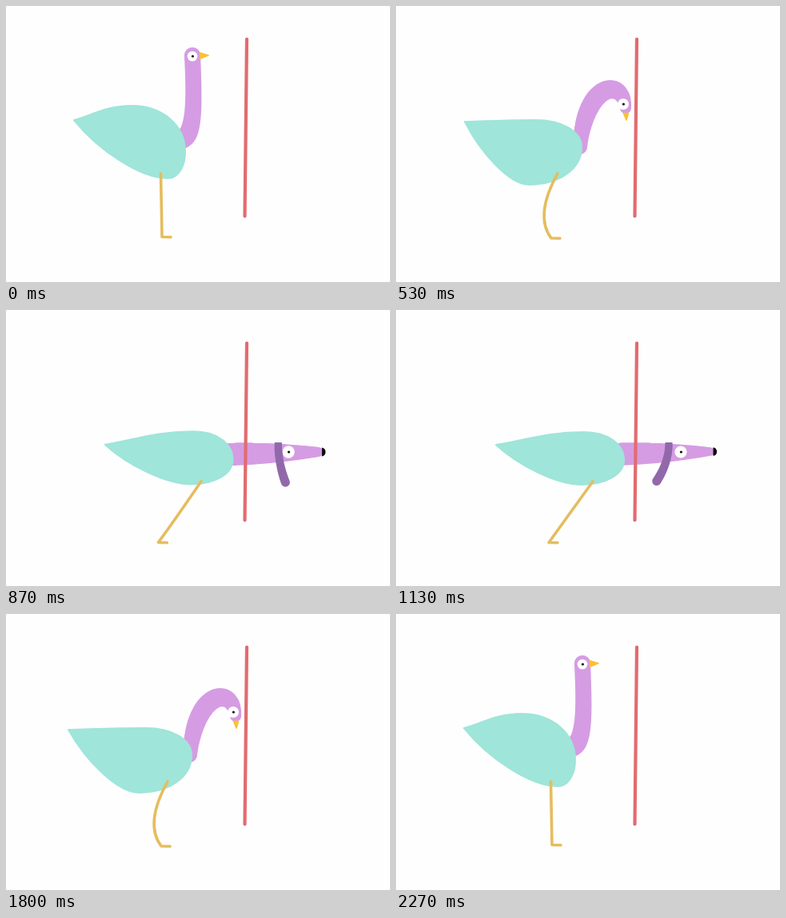
Animation, 480 px wide and 346 px high, one loop 2990 ms. Source, as an HTML page with a canvas:

```html
<!DOCTYPE html>
<html lang="en">
<head>
<meta charset="utf-8">
<title>Bird and pole</title>
<style>
html, body { margin: 0; width: 100%; height: 100%; overflow: hidden; background: #fefefe; }
canvas { display: block; width: 480px; height: 346px; }
</style>
</head>
<body>
<canvas id="stage" width="480" height="346"></canvas>
<script>
const ctx = document.getElementById('stage').getContext('2d');
const LOOP = 2990, FPS = 15, POLE_X = 300;
const MINT = '#9fe5d9', LILAC = '#d59ce3', LID = '#dcaae8', EAR = '#9169aa',
      LEG = '#e5bd5f', BEAK = '#fbc035', POLE = '#e16c70', INK = '#0b0b0b';

// body: tail, top, front, bottom; neck: Bezier from head to base; girth: its radii
// beak: x, y, angle, length; nose: x, y, height; leg: hip, ankle, knee bend
const stand = {
  body: [85, 143, 157, 125, 224, 183, 202, 216],
  neck: [233, 62, 235, 110, 237, 160, 221, 166], girth: [10.2, 9.5, 12.5],
  eye: [233, 63, 6.3], tip: [242, 62.3, 0, 12], ear: [240],
  leg: [193.5, 210, 195, 289.5, 0]
};
const peck = {
  body: [86, 145, 175, 143, 232, 177, 166, 224],
  neck: [287, 128, 284, 88, 236, 96, 230, 177], girth: [7, 16, 9],
  eye: [284, 123, 7], tip: [287.5, 134, 1.57, 10], ear: [240],
  leg: [202, 210, 194, 291, -24]
};
const rise = {
  body: [85, 149, 176, 128, 228, 174, 190, 210],
  neck: [257, 63, 228, 82, 238, 115, 230, 162], girth: [7, 9.5, 11],
  eye: [252, 66.5, 7], tip: [261, 67.5, 0.85, 11], ear: [240],
  leg: [193.5, 204, 194, 292, 1]
};
const out = {
  dog: true,
  body: [120, 168, 235, 150, 279, 186, 230, 217],
  neck: straight(383, 179.5, 270, 182), girth: [8.3, 14.5, 14.5],
  eye: [344.5, 178, 7.8], tip: [390, 179.5, 5.7, 0], ear: [338],
  leg: [238, 214, 188.5, 291, 4]
};
const rest = {
  dog: true,
  body: [125, 169, 235, 153, 285, 188, 232, 219],
  neck: straight(393, 177.5, 275, 181), girth: [5.3, 14, 14],
  eye: [356, 178, 7.6], tip: [396.5, 177.5, 5.3, 0], ear: [341],
  leg: [246, 215, 191, 291.5, 0]
};
const tall = {
  ...stand,
  neck: [238, 31, ...stand.neck.slice(2)],
  eye: [238, 32, 6.3], tip: [247, 31.3, 0, 12]
};
const dive = {
  ...mix(peck, out, 0.45),
  dog: true,
  neck: straight(318, 179, 240, 180),
  eye: [285, 176, 7], tip: [323, 179, 5.5, 0]
};
const recoil = { ...peck, body: [78, ...peck.body.slice(1)] };

const keys = [
  [0, stand], [3, tall], [4, tall], [6, mix(rise, peck, 0.4)], [8, peck],
  [9, dive], [11, out], [13, mix(out, rest, 0.75)], [16, rest], [25, rest],
  [26, mix(rest, dive, 0.6)], [27, recoil], [29, rise], [31, stand], [60, stand]
];
const BLINK = 25, EAR_LENGTH = 48;

function lerp(a, b, k) {
  return a + (b - a) * k;
}

function straight(x0, y0, x1, y1) {
  return [0, 1 / 3, 2 / 3, 1].flatMap(k => [lerp(x0, x1, k), lerp(y0, y1, k)]);
}

function mix(a, b, k) {
  const pose = { dog: a.dog };
  for (const part in a)
    if (part !== 'dog') pose[part] = a[part].map((v, i) => lerp(v, b[part][i], k));
  return pose;
}

function poseAt(tick) {
  const i = keys.findIndex(key => key[0] > tick);
  const [t0, a] = keys[i - 1], [t1, b] = keys[i];
  return tick === t0 ? a : mix(a, b, (tick - t0) / (t1 - t0));
}

// de Casteljau, for any number of values
function bezier(values, k) {
  while (values.length > 1)
    values = values.slice(1).map((v, i) => lerp(values[i], v, k));
  return values[0];
}

function tube(list, girth, color) {
  const xs = list.filter((v, i) => i % 2 === 0), ys = list.filter((v, i) => i % 2);
  ctx.beginPath();
  for (let k = 0; k <= 1; k += 1 / 128) {
    const x = bezier(xs, k), y = bezier(ys, k), r = bezier(girth, k);
    ctx.moveTo(x + r, y);
    ctx.arc(x, y, r, 0, 7);
  }
  fill(color);
}

function fill(color, edge) {
  ctx.fillStyle = ctx.strokeStyle = color;
  ctx.fill();
  if (edge) {
    ctx.lineWidth = edge;
    ctx.stroke();
  }
}

function stroke(color, width) {
  ctx.strokeStyle = color;
  ctx.lineWidth = width;
  ctx.stroke();
}

function line(x0, y0, x1, y1, color, width) {
  ctx.beginPath();
  ctx.moveTo(x0, y0);
  ctx.lineTo(x1, y1);
  stroke(color, width);
}

function disc(x, y, r, color) {
  ctx.beginPath();
  ctx.arc(x, y, r, 0, 7);
  fill(color);
}

function drawBody([tx, ty, ux, uy, fx, fy, bx, by]) {
  const ROUND = 0.58;
  ctx.beginPath();
  ctx.moveTo(tx, ty);
  ctx.bezierCurveTo(lerp(tx, ux, 0.3), lerp(ty, uy, 0.3), lerp(ux, tx, 0.45), uy, ux, uy);
  ctx.bezierCurveTo(lerp(ux, fx, ROUND), uy, fx, lerp(fy, uy, ROUND), fx, fy);
  ctx.bezierCurveTo(fx, lerp(fy, by, ROUND), lerp(bx, fx, ROUND), by, bx, by);
  ctx.bezierCurveTo(lerp(bx, tx, 0.3), by, lerp(tx, bx, 0.25), lerp(ty, by, 0.5), tx, ty);
  ctx.closePath();
  fill(MINT, 2);
}

function drawLeg([hx, hy, ax, ay, bend]) {
  ctx.beginPath();
  ctx.moveTo(hx, hy);
  ctx.quadraticCurveTo(lerp(hx, ax, 0.65) + bend, lerp(hy, ay, 0.65), ax, ay);
  ctx.lineTo(ax + 11, ay + 0.3);
  stroke(LEG, 3.6);
}

function drawEye([x, y, r], shut) {
  if (shut) {
    ctx.beginPath();
    ctx.roundRect(x - 10, y - 9, 21, 18, 7);
    fill(LID);
    line(x - 7, y + 0.6, x + 3.5, y - 0.2, INK, 2.6);
  } else {
    disc(x, y, r, '#fff');
    disc(x + 0.4, y, 1.6, INK);
  }
}

function drawBeak([x, y, angle, len]) {
  const half = len * 0.3;
  ctx.save();
  ctx.translate(x, y);
  ctx.rotate(angle);
  ctx.beginPath();
  ctx.moveTo(0.6, -half);
  ctx.lineTo(len - 1, -0.5);
  ctx.lineTo(0.6, half);
  ctx.closePath();
  fill(BEAK, 1.6);
  ctx.restore();
}

// the ear swings every six ticks until it hangs still
function earSwing(tick) {
  const fade = Math.max(0, 1 - (tick - 9) / 12);
  return -20 * Math.cos((tick - 11) * Math.PI / 3) * fade ** 0.25;
}

function drawDogFace({ eye, tip: [x, y, half], ear: [root] }, tick) {
  const dx = earSwing(tick), drop = Math.sqrt(EAR_LENGTH ** 2 - dx * dx);
  ctx.save();
  ctx.beginPath();
  ctx.rect(POLE_X, 166, 180, 180);
  ctx.clip();
  drawEye(eye, tick === BLINK);
  tube([root, 168, root, 168 + drop / 2, root + dx, 169 + drop], [4.7, 5, 5.6], EAR);
  ctx.beginPath();
  ctx.ellipse(x, y, 4.6, half, 0, -Math.PI / 2, Math.PI / 2);
  fill(INK);
  ctx.restore();
}

function draw(tick) {
  const pose = poseAt(tick);
  ctx.fillStyle = '#fefefe';
  ctx.fillRect(0, 0, 480, 346);
  ctx.lineCap = ctx.lineJoin = 'round';

  tube(pose.neck, pose.girth, LILAC);
  if (pose.dog) {
    drawDogFace(pose, tick);
  } else {
    drawBeak(pose.tip);
    drawEye(pose.eye, false);
  }
  drawBody(pose.body);
  drawLeg(pose.leg);
  line(301, 41.5, 298.5, 263.5, POLE, 4.2);
}

const start = performance.now();
function loop() {
  const t = (performance.now() - start) % LOOP;
  draw(Math.floor((t + 4) * FPS / 1000));
  requestAnimationFrame(loop);
}
loop();
</script>
</body>
</html>
```
